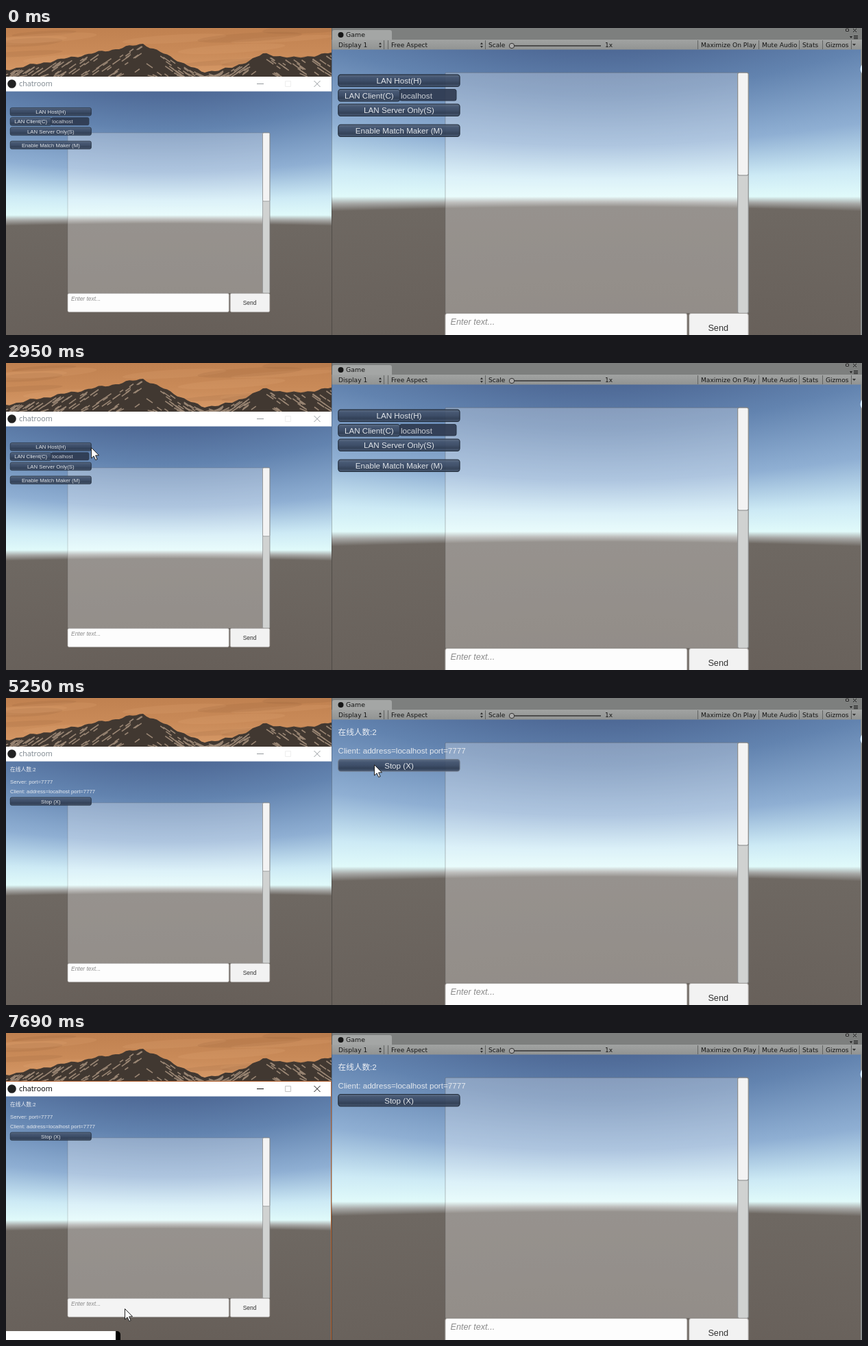
Animation of 1249x448 px, one loop 8 s. Source, as an HTML page with a canvas:

```html
<!DOCTYPE html>
<html lang="en">
<head>
<meta charset="utf-8">
<title>Chatroom</title>
<style>
html, body { margin: 0; width: 100%; height: 100%; overflow: hidden; background: #777; }
canvas { display: block; }
</style>
</head>
<body>
<canvas id="stage" width="1249" height="448"></canvas>
<script>
const LOOP = 8000;
const TICK = 77;
const stage = document.getElementById('stage');
let ctx = stage.getContext('2d');
const SANS = '"Liberation Sans", "Noto Sans CJK SC", "Noto Sans CJK", sans-serif';
const EDITOR = '"DejaVu Sans", sans-serif';

// Sky colour by slope above (+) or below (-) the horizon
const SKY = {
  .6: '#4b6592', .4: '#6283af', .2: '#8fafd3', .07: '#cdeaf5', 0: '#e0fafa',
  '-.02': '#a6a7a5', '-.04': '#6e6862', '-.6': '#665e58'
};

// Where the cursor heads, and when
const MOVES = [
  { from: 300, to: 300, x: 693, y: 207 },
  { from: 680, to: 1380, x: 507, y: 108 },
  { from: 1700, to: 2470, x: 137, y: 190 },
  { from: 2580, to: 2950, x: 124, y: 123 },
  { from: 3024, to: 3170, x: 100, y: 120 },
  { from: 3340, to: 4140, x: 578, y: 192 },
  { from: 4230, to: 4540, x: 537, y: 97 },
  { from: 5330, to: 5570, x: 545, y: 107 },
  { from: 5760, to: 6280, x: 213, y: 430 },
  { from: 6600, to: 6985, x: 173, y: 402 }
];

function randomizer(seed) {
  return () => (seed = seed * 16807 % 2147483647) / 2147483647;
}

function rect(x, y, w, h, fill, radius = 0, line) {
  ctx.beginPath();
  ctx.roundRect(x, y, w, h, radius);
  ctx.fillStyle = fill;
  ctx.fill();
  if (line) { ctx.strokeStyle = line; ctx.stroke(); }
}

function circle(x, y, r, fill, line) {
  ctx.beginPath();
  ctx.arc(x, y, r, 0, 7);
  ctx.fillStyle = fill;
  ctx.fill();
  if (line) { ctx.strokeStyle = line; ctx.stroke(); }
}

function poly(points, fill, line) {
  ctx.beginPath();
  for (const [x, y] of points) ctx.lineTo(x, y);
  ctx.closePath();
  ctx.fillStyle = fill;
  ctx.fill();
  if (line) { ctx.strokeStyle = line; ctx.stroke(); }
}

function line(color, x1, y1, x2, y2) {
  ctx.beginPath();
  ctx.moveTo(x1, y1);
  ctx.lineTo(x2, y2);
  ctx.strokeStyle = color;
  ctx.stroke();
}

function cross(color, x, y, r) {
  line(color, x - r, y - r, x + r, y + r);
  line(color, x + r, y - r, x - r, y + r);
}

function triangle(x, y, w, h, color) {
  poly([[x - w, y], [x, y + h], [x + w, y]], color);
}

// Text whose vertical middle lies at y
function text(str, x, y, size, color, align = 'left', font = SANS, style = '') {
  ctx.font = `${style} ${size}px ${font}`;
  ctx.textAlign = align;
  ctx.fillStyle = color;
  ctx.fillText(str, x, y + size * .36);
}

function gradient(y1, y2, ...colors) {
  const g = ctx.createLinearGradient(0, y1, 0, y2);
  colors.forEach((c, i) => g.addColorStop(i / (colors.length - 1), c));
  return g;
}

// Every column of the perspective view stretches the same gradient.
function drawSky(left, width, top, horizon) {
  const focal = (horizon - top) / .577;
  for (let x = 0; x < width; x++) {
    const reach = .6 * Math.hypot(focal, x - width / 2);
    const g = ctx.createLinearGradient(0, horizon - reach, 0, horizon + reach);
    for (const slope in SKY) g.addColorStop(.5 - slope / 1.2, SKY[slope]);
    ctx.fillStyle = g;
    ctx.fillRect(left + x, top, 1, 448 - top);
  }
}

function ridge(x) {
  const flank = (peak, y, rise, fall) => y + Math.abs(x - peak) * (x < peak ? rise : fall);
  const jagged = Math.sin(x * .31) + Math.sin(x * .13);
  return Math.min(flank(200, 23, .19, .48), flank(375, 38, .45, .12), flank(490, 34, .15, 0)) + jagged;
}

function drawMountains() {
  const random = randomizer(41);
  rect(0, 0, 475, 71, gradient(0, 71, '#c08150', '#c98a58', '#d79a68'));
  for (let i = 0; i < 14; i++) {
    ctx.fillStyle = i % 2 ? 'rgba(135,85,55,.14)' : 'rgba(235,175,125,.14)';
    ctx.beginPath();
    ctx.ellipse(random() * 475, random() * 50, 40 + random() * 50, 3 + random() * 4, -.06, 0, 7);
    ctx.fill();
  }
  const outline = [[475, 71], [0, 71]];
  for (let x = 0; x <= 475; x += 5) outline.splice(-2, 0, [x, ridge(x)]);
  poly([[0, 71], ...outline.slice(0, -2), [475, 71]], '#413831');
  ctx.lineWidth = 1.6;
  for (let i = 0; i < 170; i++) {
    const x = random() * 475;
    const y = ridge(x) + 3 + random() * (66 - ridge(x));
    const length = 4 + random() * 9;
    const side = x < 200 || (x > 300 && x < 375) ? -1 : 1;
    line('#9a8674', x, y, x + side * length, Math.min(71, y + length * .7));
  }
  ctx.lineWidth = 1;
}

function drawEditorBar() {
  const ink = '#161616';
  const labels = {
    'Display 1': 485, 'Free Aspect': 562, 'Scale': 704, 'Maximize On Play': 1014,
    'Mute Audio': 1103, 'Stats': 1162, 'Gizmos': 1196, '1x': 874
  };
  rect(475, 0, 774, 17, '#7d7f7e');
  rect(476, 3, 87, 15, '#a4a6a5', [3, 3, 0, 0]);
  rect(475, 17, 774, 14.5, gradient(17, 31, '#a1a3a2', '#929493'));
  circle(488.5, 10, 4, ink);
  text('Game', 496, 10, 9.4, ink, 'left', EDITOR);
  for (const [label, x] of Object.entries(labels)) {
    text(label, x, 24.5, 9.1, ink, 'left', EDITOR);
    if (label !== 'Display 1' && label !== '1x') line('#626463', x - 4.5, 18, x - 4.5, 31);
  }
  for (const x of [551.5, 1233.5]) line('#626463', x, 18, x, 31);
  for (const x of [546, 694]) {
    triangle(x, 24, 2, -3, '#333');
    triangle(x, 26, 2, 3, '#333');
  }
  triangle(1237.5, 23, 2.5, 3, '#333');
  rect(738, 25, 130, 2, '#4c4c4c');
  circle(738, 26, 3.7, '#aaa', '#333');
  rect(1225.5, 1.5, 4, 3, '#999', 0, '#222');
  cross('#222', 1238.5, 3.5, 2.5);
  for (let y = 11.5; y < 16; y += 2) line('#222', 1237, y, 1243, y);
  triangle(1233, 12, 2, 3, '#222');
}

function drawButton(str, x, y, w, hover) {
  const fill = gradient(y, y + 11.6, '#5a697f', '#40506a', '#394861', '#2c394e', '#43526a');
  ctx.globalAlpha = .92;
  rect(x, y, w, 11.6, fill, 2.4, hover ? '#717b89' : '#1b2430');
  ctx.globalAlpha = 1;
  text(str, x + w / 2, y + 6, 7.75, '#e0e4e9', 'center');
}

const rowY = row => 24.4 + row * 14.3;

function drawLobby() {
  drawButton('LAN Host(H)', 6.2, rowY(0), 118.2);
  drawButton('LAN Client(C)', 6.2, rowY(1), 60);
  rect(66, rowY(1), 55, 11, 'rgba(45,56,78,.9)', 2, '#2b3749');
  text('localhost', 67, rowY(1) + 6, 7.75, '#c8ccd3');
  drawButton('LAN Server Only(S)', 6.2, rowY(2), 118.2);
  drawButton('Enable Match Maker (M)', 6.2, rowY(3.4), 118.2);
}

function drawSession(count, isServer, hover) {
  const lines = ['Client: address=localhost port=7777'];
  if (isServer) lines.unshift('Server: port=7777');
  text('在线人数:' + count, 6, 12.2, 7.75, '#eceff4');
  lines.forEach((str, row) => text(str, 6, rowY(row) + 6, 7.75, '#e4e8ee'));
  drawButton('Stop (X)', 6.2, rowY(lines.length), 118.2, hover);
}

function drawChat(x, y, inputColor) {
  ctx.save();
  ctx.translate(x, y);
  rect(0, 0, 295, 234, 'rgba(255,255,255,.28)', 1, 'rgba(90,90,90,.35)');
  rect(284.5, 0, 10.3, 234, '#d0d2d1', 1.5, '#8b8d8e');
  rect(284.5, 0, 10.3, 99.8, '#f3f3f3', 1.5, '#858788');
  rect(0, 234.2, 235.3, 27.2, inputColor, 2, '#a8a5a2');
  rect(237.2, 234.2, 57.6, 27.2, '#f2f2f2', 2, '#a8a5a2');
  text('Enter text...', 5, 241.8, 8.45, '#8c8c8c', 'left', SANS, 'italic');
  text('Send', 265.5, 248, 8.45, '#323232', 'center');
  ctx.restore();
}

function drawScene(x, y, scale, chatX, chatY, inputColor, drawMenu) {
  ctx.save();
  ctx.translate(x, y);
  ctx.scale(scale, scale);
  ctx.lineWidth = .7;
  drawChat(chatX, chatY, inputColor);
  drawMenu();
  ctx.restore();
}

function drawTitleBar(active) {
  const ink = active ? '#111' : '#959a9e';
  rect(0, 71, 475, 21.5, '#fff');
  circle(8.5, 81.5, 6.3, '#222');
  text('chatroom', 19, 81.5, 10.8, active ? '#000' : '#7b858d', 'left', '"Open Sans", sans-serif');
  line(ink, 366, 81.5, 376, 81.5);
  cross(ink, 454, 81.5, 4.5);
  rect(407.5, 77.5, 8, 8, '#fff', 0, active ? '#c4c4c4' : '#eee');
  if (active) {
    line('#b8622f', 0, 70.5, 475, 70.5);
    line('#b8622f', 474.5, 70, 474.5, 448);
  }
}

// Each move advances in discrete, eased steps.
function cursorAt(t) {
  let x = 925, y = 341;
  for (const move of MOVES) {
    if (t < move.from) break;
    const steps = Math.round((move.to - move.from) / TICK) + 1;
    const interval = (move.to - move.from) / (steps - 1) || TICK;
    const u = Math.min(steps, 1 + Math.floor((t - move.from) / interval)) / steps;
    const eased = u * u * (3 - 2 * u);
    x += (move.x - x) * eased;
    y += (move.y - y) * eased;
  }
  return [x, y];
}

function drawCursor(t) {
  const [x, y] = cursorAt(t);
  ctx.save();
  ctx.translate(x + .5, y + .5);
  poly([[0, 0], [0, 15.5], [3.6, 12.3], [6.2, 18], [8.6, 17], [6.1, 11.4], [11, 11.2]], '#fff', '#222');
  ctx.restore();
}

const backdrop = document.createElement('canvas');
backdrop.width = stage.width;
backdrop.height = stage.height;

function drawBackdrop() {
  const screen = ctx;
  ctx = backdrop.getContext('2d');
  drawMountains();
  drawSky(0, 475, 92, 273);
  drawSky(475, 774, 31, 246);
  drawEditorBar();
  line('rgba(0,0,0,.25)', 475.5, 0, 475.5, 448);
  rect(1247, 31, 2, 417, '#8b8d8d');
  circle(1256, 60, 9.5, '#dcefff');
  ctx = screen;
}

function draw(t) {
  const hosting = t >= 3340;
  const joined = t >= 5080;
  const typing = t >= 7140;
  const active = typing || (t >= 3090 && t < 4920);
  ctx.drawImage(backdrop, 0, 0);
  drawTitleBar(active);
  drawScene(0, 92, 1, 90, 61, typing ? '#f4f4f4' : '#fdfdfd',
    () => hosting ? drawSession(joined ? 2 : 1, true) : drawLobby());
  drawScene(475.5, 31.5, 1.5, 110.3, 22.5, '#fdfdfd',
    () => joined ? drawSession(2, false, t < 5760) : drawLobby());
  if (t >= 7690) {
    rect(0, 435, 167, 20, '#000', [0, 5, 0, 0]);
    rect(0, 435, 160, 13, '#fff');
  }
  if (t >= 220) drawCursor(t);
}

drawBackdrop();
const begin = performance.now();
function tick() {
  draw((performance.now() - begin) % LOOP);
  requestAnimationFrame(tick);
}
tick();
</script>
</body>
</html>
```
